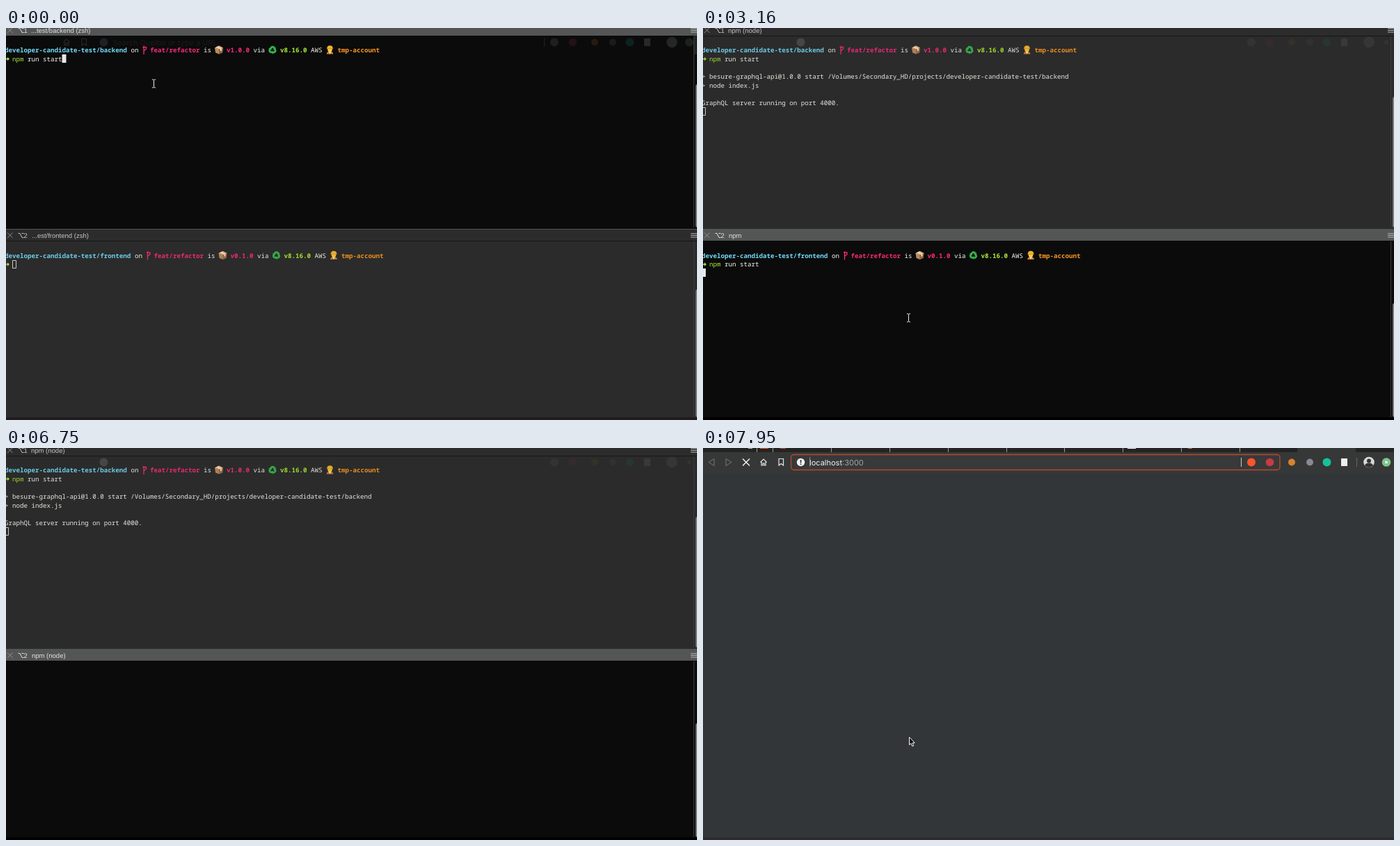
An HTML page with a canvas for the animation above (8000 ms loop, 993x564 px).

```html
<!DOCTYPE html>
<html lang="en">
<head>
<meta charset="utf-8">
<title>Starting a backend and a frontend</title>
<style>
html, body { margin: 0; width: 993px; height: 564px; overflow: hidden; background: #000; }
canvas { display: block; }
</style>
</head>
<body>
<canvas id="stage" width="993" height="564"></canvas>
<script>
const ctx = document.getElementById('stage').getContext('2d');
const LOOP = 8000, COL = 5.5, ROW = 12.6;
const MONO = '500 9.17px "Noto Sans Mono", monospace';
const MONO_BOLD = MONO.replace('500', '700');
const TITLE = '9.5px "Liberation Sans", Arial, sans-serif';
const UI = '11px Inter, sans-serif';
const CYAN = '#72dcf8', PINK = '#fa2a78', GREEN = '#a9ea32', ORANGE = '#fd971f', WHITE = '#f8f8f2';

function rect(x, y, w, h, color) {
  ctx.fillStyle = color;
  ctx.fillRect(x, y, w, h);
}
function disc(x, y, r, color) {
  ctx.fillStyle = color;
  ctx.beginPath();
  ctx.arc(x, y, r, 0, 7);
  ctx.fill();
}
function fill(d, color) {
  ctx.fillStyle = color;
  ctx.fill(new Path2D(d));
}
function line(d, color, width = 1) {
  ctx.strokeStyle = color;
  ctx.lineWidth = width;
  ctx.stroke(new Path2D(d));
}
function text(s, x, y, color, font) {
  ctx.font = font;
  ctx.textRendering = 'geometricPrecision';
  ctx.fillStyle = color;
  ctx.fillText(s, x, y);
}
function placed(x, y, draw) {
  ctx.save();
  ctx.translate(x, y);
  draw();
  ctx.restore();
}
// Latest entry [time, ...values] that has begun
const latest = (steps, t) => steps.filter(s => s[0] <= t).pop();

// Terminal icons, each about 12px wide and centred on the origin
function parcel() {
  fill('M-6-3L0-6L6-3L5 4L0 6L-5 4Z', '#b98a5e');
  fill('M0-1L6-3L5 4L0 6Z', '#8d6540');
  fill('M-6-3L0-6L6-3L0-1Z', '#d9b184');
  fill('M-4-4L-2-5L4-2V1L2 2V-1Z', '#f0dcc0');
}
function recycle() {
  for (let i = 0; i < 3; i++) {
    line('M-2.9-2L-.7-4.4L1.4-4.2L2.8-2.5', '#35b44a', 2.8);
    fill('M4.8-4L4.3.2L.5-1.2Z', '#35b44a');
    ctx.rotate(Math.PI * 2 / 3);
  }
}
function worker() {
  fill('M-5 6Q-4 2 0 2Q4 2 5 6Z', '#d9822b');
  fill('M-2 2L0 6L2 2Z', '#e9e4d0');
  disc(0, -.5, 3.3, '#f6c945');
  fill('M-4.4-1.8Q-4-6.2 0-6.2Q4-6.2 4.4-1.8Z', '#f3b52a');
  line('M-4.6-1.8H4.6', '#d39013');
}

function terminalRow(top, row, col, s, color, font = MONO) {
  text(s, -2 + col * COL, Math.round(top + 35.3 + row * ROW), color, font);
}
function prompt(top, dir, version) {
  const path = 'developer-candidate-test/' + dir, n = path.length;
  const put = (col, s, color) => terminalRow(top, 0, col, s, color, MONO_BOLD);
  const word = (col, s) => terminalRow(top, 0, n + col, s, WHITE);
  const icon = (col, draw) => placed(3.5 + (n + col) * COL, top + 31.5, draw);
  put(0, path, CYAN);
  word(1, 'on');
  placed(-2 + (n + 4) * COL, top + 26, () => line('M2 0V12M2 7L5.5 4V1M.5 1.5H5', PINK, 1.3));
  put(n + 6, 'feat/refactor', PINK);
  word(20, 'is');
  icon(23, parcel);
  put(n + 26, version, PINK);
  word(33, 'via');
  icon(37, recycle);
  put(n + 40, 'v8.16.0', GREEN);
  word(48, 'AWS');
  icon(52, worker);
  put(n + 55, 'tmp-account', ORANGE);
  placed(0, top + 44.5, () => fill('M0-.8H2V-2.8L5 0L2 2.8V.8H0Z', GREEN));
}
function command(top) {
  terminalRow(top, 1, 2, 'npm', GREEN);
  terminalRow(top, 1, 6, 'run start', WHITE);
}
function caret(top, row, col, active) {
  const x = -2 + col * COL, y = Math.round(top + 25.7 + row * ROW);
  if (active) rect(x, y, 6, 12, '#e8e8e4');
  else line(`M${x + .5} ${y + .5}h5v11h-5z`, '#d8d8d4');
}
function header(top, key, title, active) {
  const ink = active ? '#e2e2e2' : '#c4c4c4', dim = active ? '#8f8f8f' : '#8a8a8a';
  rect(0, top - 6, 993, 17, active ? '#545655' : '#2c2c2c');
  if (!active) {
    rect(0, top - 6, 993, 1, '#565656');
    rect(0, top + 11, 993, 1, '#161616');
  }
  placed(0, top, () => {
    line('M2-.5L9.5 7M9.5-.5L2 7', dim);
    line('M17.5 .5H20L23 6.5H25.5M22.5 .5H25.5', ink);
    line('M984 .8H993M984 3.4H993M984 6H993', '#b4b4b4');
    text(key, 25.5, 6.7, ink, TITLE);
    text(title, top ? 37 : 36, 6.7, ink, TITLE);
  });
}
function scrollbar(from, thumb, to) {
  rect(988, from, 1, to - from, '#3c3c3c');
  ctx.fillStyle = '#7c7c7c';
  ctx.beginPath();
  ctx.roundRect(991, thumb, 5, to - thumb, 2.5);
  ctx.fill();
}

// Browser toolbar pieces, also seen faintly through the terminal
function homeAndBookmark() {
  line('M82.5 20.5L87 16L91.5 20.5M84 20V25H86V22H88V25H90V20', '#e6e6e6', 1.2);
  line('M109 15.5H115.5V25L112.2 22.5L109 25Z', '#e6e6e6', 1.2);
}
function badges(shield) {
  disc(788, 20.5, 6, shield);
  disc(814.5, 20.5, 5.8, '#c93a45');
  disc(846, 20.5, 5, '#d9822f');
  disc(872, 20.5, 5, '#8c8790');
  disc(896.5, 20.5, 6, '#15c39a');
  rect(917, 15, 9, 11, '#eee');
}
function avatar() {
  disc(957, 20.5, 7.8, '#d8d8d8');
  disc(957, 18.5, 3, '#333');
  fill('M951 25.5Q952 21.5 957 21.5Q962 21.5 963 25.5Q957 30.5 951 25.5Z', '#333');
}
const searchHint = () => text('Search Quelbo or type a URL', 153, 24.5, '#b9b9b9', UI);

function ghost(focused) {
  ctx.save();
  ctx.globalAlpha = .13;
  disc(140.5, 20.5, 6, focused ? '#a9b4c8' : '#fff');
  if (focused) {
    homeAndBookmark();
    rect(773, 14, 1, 13, '#ccc');
    rect(988, 11, 5, 27, '#bbb');
    ctx.globalAlpha = .09;
    searchHint();
  }
  ctx.globalAlpha = focused ? .13 : .07;
  badges('#aaa');
  avatar();
  disc(982, 20.5, focused ? 6 : 3, '#7cc48b');
  ctx.restore();
}

function terminal(t) {
  const first = t < 1210, second = !first;
  const dark = '#0b0b0c', grey = '#2b2b2b';
  rect(0, 0, 993, 289, first ? dark : grey);
  rect(0, 289, 993, 275, first ? grey : dark);
  rect(0, 560, 993, 4, first ? '#211c1f' : '#000');
  ghost(first);

  header(0, '1', latest([[0, '...test/backend (zsh)'], [320, 'npm'], [1210, 'npm (zsh)'], [2260, 'npm (node)']], t)[1], first);
  header(295, '2', latest([[0, '...est/frontend (zsh)'], [3160, 'npm'], [4050, 'npm (node)']], t)[1], second);
  scrollbar(12, t < 150 ? 81 : 99, 287);
  scrollbar(307, t < 3160 ? 376 : 396, 560);

  ctx.globalAlpha = first ? 1 : .9;
  prompt(0, 'backend', 'v1.0.0');
  command(0);
  if (t >= 760) {
    terminalRow(0, 3, 0, '> besure-graphql-api@1.0.0 start /Volumes/Secondary_HD/projects/developer-candidate-test/backend', WHITE);
    terminalRow(0, 4, 0, '> node index.js', WHITE);
  }
  if (t >= 1360) terminalRow(0, 6, 0, 'GraphQL server running on port 4000.', WHITE);
  const [, row, col] = latest([[0, 1, 15], [150, -1], [320, 2, 0], [760, 6, 0], [1360, 7, 0]], t);
  if (row > 0) caret(0, row, col, first);

  ctx.globalAlpha = second ? 1 : .92;
  if (t < 6750) {
    prompt(295.5, 'frontend', 'v0.1.0');
    if (t >= 1960) command(295.5);
    if (t >= 3750) {
      terminalRow(295.5, 3, 0, '> react-graphql@0.1.0 start /Volumes/Secondary_HD/projects/developer-candidate-test/frontend', WHITE);
      terminalRow(295.5, 4, 0, '> react-scripts start', WHITE);
    }
    const [, r, c] = latest([[0, 1, 2], [1210, -1], [1360, 1, 2], [1960, 1, 15], [3160, 2, 0],
      [3750, 6, 0], [4350, -1], [4950, 6, 0], [5400, -1], [6000, 6, 0], [6450, -1]], t);
    if (r > 0) caret(295.5, r, c, second);
  }
  ctx.globalAlpha = 1;

  if (t < 6750) {
    const [, x, y] = latest([[0, 212.5, 80], [150, 227, 132], [320, 265, 277], [470, 297, 439],
      [620, 300, 431.5], [760, 295.5, 417]], t);
    const beam = 'M-2.5-6Q0-6 0-4.5Q0-6 2.5-6M0-4.5V4.5M-2.5 6Q0 6 0 4.5Q0 6 2.5 6';
    placed(x, y, () => line(beam, '#eee'));
  }
}

function browser(t) {
  const loading = t >= 7100, tool = loading ? '#363737' : '#383838';
  rect(0, 0, 993, 564, loading ? '#333638' : '#000');
  rect(0, 560, 993, 4, loading ? '#2e2a31' : '#080208');
  rect(0, 0, 993, 36, tool);
  rect(0, 0, 993, 6, loading ? '#242424' : '#4b4b4b');

  // Tabs share the strip between the pinned pair and its right end
  const count = loading ? 10 : 9, width = 838 / count;
  rect(938 - width, 0, width, 6, tool);
  rect(77, 0, 1, 6, '#999');
  for (let i = 0; i < count - 1; i++) rect(Math.round(100.4 + i * width), 0, 1, 6, '#999');
  rect(65, 0, 6, 1, '#bbb');
  rect(82, 0, 12, 1, '#ff5a1f');
  rect(loading ? 111 : 106, 0, 8, 1, '#b5583a');
  rect(loading ? 610 : 666, 0, 12, 1, '#fff');
  rect(loading ? 697 : 761, 0, 6, 1, '#d9752c');

  line('M16 15.5V25.5L8 20.5Z', '#777');
  line('M33 15.5V25.5L41 20.5Z', '#777');
  if (loading) line('M57 15.5L67 25.5M67 15.5L57 25.5', '#f0f0f0', 1.5);
  else {
    line('M66 18A5 5 0 1 0 66.8 21.5', '#777', 1.2);
    fill('M67.5 15V19.5H63Z', '#777');
  }
  homeAndBookmark();

  ctx.beginPath();
  ctx.roundRect(126.5, 9.5, 702.5, 22, 4);
  ctx.fillStyle = loading ? '#38393a' : '#212121';
  ctx.fill();
  if (loading) {
    ctx.strokeStyle = '#b24a33';
    ctx.lineWidth = 1.4;
    ctx.stroke();
    disc(140.5, 20.5, 5.7, '#f4f4f4');
    rect(139.7, 17, 1.7, 4.5, '#333');
    rect(139.7, 22.5, 1.7, 1.7, '#333');
    text('localhost', 153, 24.5, '#f2f2f2', UI);
    const hostWidth = ctx.measureText('localhost').width;
    text(':3000', 153 + hostWidth, 24.5, '#a5a5a5', UI);
    if (t < 7480 || t >= 7950) rect(153, 13, 1, 14, '#8c8c8c');
  } else {
    disc(140.5, 20.5, 6, '#4285f4');
    searchHint();
  }
  rect(773, 14, 1, 13, '#ccc');
  badges(t >= 7300 ? '#fb542b' : '#c4c4c4');
  rect(939, 14, 1, 13, '#666');
  avatar();
  disc(982, 20.5, 6.3, '#7cc48b');
  disc(982, 20.5, 2, '#e4f4e6');

  placed(296.5, 416, () => {
    const arrow = 'M0 0V11L2.5 8.8L4.3 13L6.2 12.2L4.4 8.2H7.7Z';
    fill(arrow, '#000');
    line(arrow, '#fff');
  });
}

function frame() {
  const t = performance.now() % LOOP;
  ctx.globalAlpha = 1;
  (t < 6900 ? terminal : browser)(t);
  requestAnimationFrame(frame);
}
frame();
</script>
</body>
</html>
```
